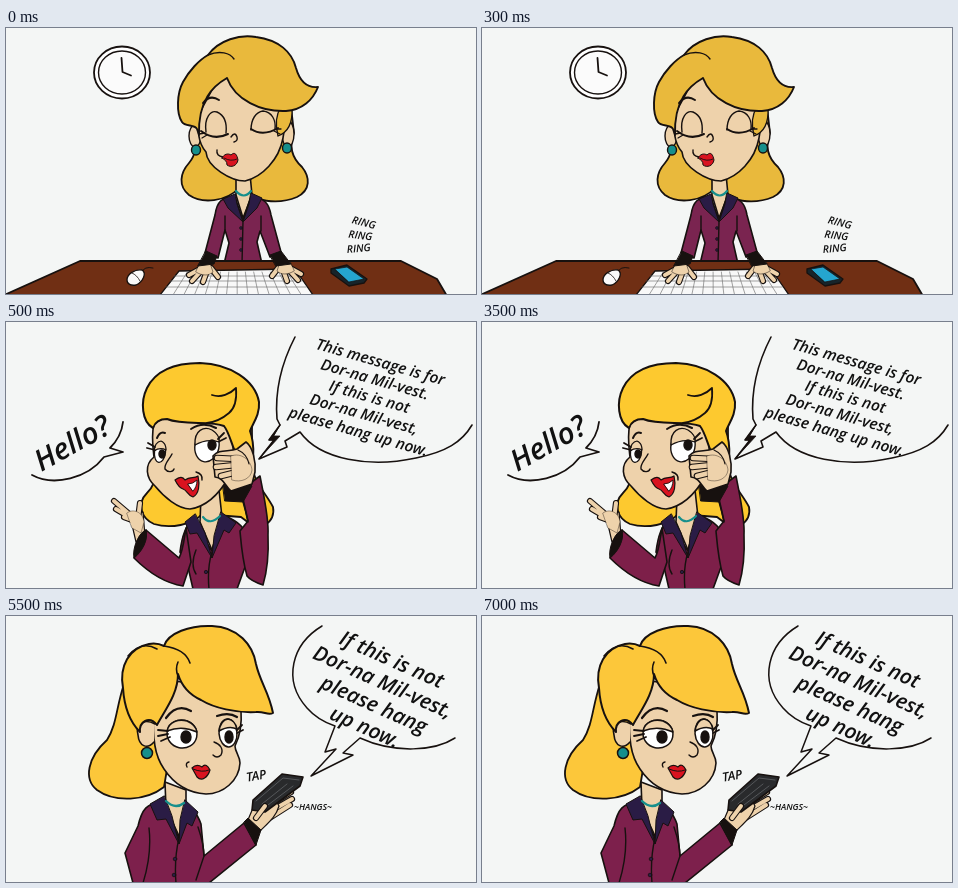
These frames come from a looping animation (470 px wide and 266 px high, 8 s). An HTML page:

```html
<!DOCTYPE html>
<html lang="en">
<head>
<meta charset="utf-8">
<title>Phone call</title>
<style>
  html, body { margin: 0; width: 100%; height: 100%; overflow: hidden; background: #f4f6f5; }
  svg { display: block; width: 100%; height: 100%; }
  .scene { visibility: hidden; }
  path, ellipse { stroke-linecap: round; stroke-linejoin: round; }
  text { font: italic 600 14px "Open Sans", "Noto Sans", sans-serif; fill: #111; }
</style>
</head>
<body>
<svg id="stage" viewBox="0 0 470 266"></svg>
<script>
const INK = '#17110f', SKIN = '#eed2ab', TEAL = '#168f8c', RED = '#d9131f', NAVY = '#2a1c45';
const LOOP = 8000;

const shape = (d, fill, w = 1.6) =>
  `<path d="${d}" fill="${fill}" stroke="${INK}" stroke-width="${w}"/>`;
const line = (d, w = 1.4, color = INK) =>
  `<path d="${d}" fill="none" stroke="${color}" stroke-width="${w}"/>`;
const oval = (x, y, rx, ry, fill, w = 1.4, turn = 0) =>
  `<ellipse cx="${x}" cy="${y}" rx="${rx}" ry="${ry}" fill="${fill}" stroke="${INK}" stroke-width="${w}" transform="rotate(${turn} ${x} ${y})"/>`;
// Outlined rounded strokes, used for fingers
const limb = (d, w = 5) => line(d, w + 2.2) + line(d, w, SKIN);
const label = (str, x, y, size, turn) =>
  `<text transform="translate(${x} ${y}) rotate(${turn})" text-anchor="middle" style="font-size:${size}px">${str}</text>`;
const lines = (list, x, y, dx, dy, size, turn) =>
  list.map((str, i) => label(str, x + dx * i, y + dy * i, size, turn)).join('');

function clock() {
  return oval(116, 44.5, 28, 26, '#fff', 1.8) + oval(116, 44.5, 23.5, 21.5, '#fbfbfb', 1.4) +
    line('M115.5 30L116.5 44L125 47.5', 1.8);
}

function keyboard() {
  let keys = '';
  for (const y of [248, 253, 259]) keys += `M${172 - (y - 243) * .75} ${y}H${289 + (y - 243) * .7}`;
  for (let i = 1; i < 14; i++) keys += `M${173 + i * 8.3} 244L${157 + i * 10.6} 266`;
  return shape('M173 243L289 241L307 267H154Z', '#f8f8f8', 1.3) + line(keys, .6, '#666');
}

function deskScene() {
  const hair = '#e9b93c', coat = '#7a2450';
  const hand = limb('M0 6L-11 12M2 7L-8 18M7 8L3 19M11 5L18 14', 4) +
    shape('M0 0L10 0L13 9C9 13 2 13 -4 9Z', SKIN, .5);
  return clock() +
    shape('M188 98C192 116 190 127 183 135C174 145 172 158 183 167C196 176 220 174 233 160C248 174 272 177 291 169C305 162 304 149 296 139C285 129 283 118 288 105L284 70L200 60Z', hair, 1.8) +
    shape('M230 148V167L237 190L246 167L244 146Z', SKIN) +
    shape('M229 169C216 169 211 173 209 187L199 225L212 230L219 202L223 215L218 236H256L251 214L254 203L264 229L275 224L265 187C263 175 258 170 245 168L237 193Z', coat) +
    line('M219 188V203M255 188V203M237 193L236 236') +
    shape('M229 166L217 171L222 180L237 194L231 176Z', NAVY, 1) +
    shape('M245 165L256 170L251 180L237 194L243 176Z', NAVY, 1) +
    line('M230 163Q238 172 245 163', 2.2, TEAL) +
    [200, 211, 222].map(y => oval(235, y, 1.4, 1.4, NAVY, .7)).join('') +
    oval(189, 108, 6, 11, SKIN) + oval(282, 106, 6, 13, SKIN) +
    oval(190, 122, 4.5, 5, TEAL) + oval(281, 120, 4.5, 5, TEAL) +
    shape('M194 84C190 104 193 116 200 124C201 139 225 153 239 153C256 149 273 132 277 110C280 94 279 78 270 72L215 45Z', SKIN) +
    shape('M275 79C269 88 270 100 272 108C280 105 287 98 286 80Z', hair, 1.3) +
    shape('M191 101C189 96 179 99 176 94C170 85 171 65 177 54C183 43 193 32 202 27C213 12 234 6 250 9C273 12 286 24 290 40C294 54 302 60 312 59C307 72 296 82 280 83C255 84 229 72 221 50C207 58 192 72 193 107Z', hair, 1.9) +
    line('M202 27C214 22 224 25 228 31') +
    line('M197 75Q204 66 213 72', 2) +
    line('M200 104C198 89 205 82 211 84C220 88 221 96 220 105M245 102C245 91 250 84 257 83C266 84 270 92 269 101') +
    line('M195 103Q208 113 222 106M245 101Q257 109 272 100', 2) +
    line('M199 105L193 106M201 107L196 110M270 101L275 101M268 103L274 106', 1.3) +
    line('M225 109Q229 103 231 109Q232 113 228 114M211 122Q210 128 217 129') +
    shape('M216 130C218 126 222 125 225 127C229 123 231 127 232 132C231 138 225 140 221 137C221 133 219 132 216 130Z', RED, 1) +
    line('M218 130Q225 134 231 131', .9) +
    shape('M74 233H395L431 251L441 268H-4Z', '#702f14', 1.8) +
    keyboard() +
    `<g transform="translate(194 235)">${hand}</g><g transform="translate(284 234) scale(-1 1)">${hand}</g>` +
    shape('M200 223L211 228L208 236L192 238Z', INK, 1) +
    shape('M264 227L275 223L285 236L270 238Z', INK, 1) +
    line('M136 244Q138 238 147 240', 1) +
    shape('M121 252C121 246 129 241 136 242C141 245 137 254 130 257C125 258 121 256 121 252Z', '#fafafa', 1.3) +
    line('M126 245Q131 247 134 253', .8) +
    shape('M325 241L341 237L361 251L358 255L343 258L325 245Z', '#17242a', 1.3) +
    shape('M329 241L341 239L358 251L343 254Z', '#25a5cf', .7) +
    label('RING', 357, 198, 10.5, 15) + label('RING', 354, 211, 10.5, 7) + label('RING', 353, 224, 10.5, -5);
}

function helloScene() {
  const hair = '#fdc92f', coat = '#7d1f49';
  return shape('M148 110C152 140 153 160 141 171C130 182 136 197 148 202C164 207 187 203 196 192L235 195C255 212 270 200 267 185C258 168 246 160 246 138V90Z', hair, 1.8) +
    shape('M195 174L194 200L206 228L216 195L213 168Z', SKIN) +
    shape('M186 199C179 204 176 214 174 230L182 245L187 267H231L239 245L241 213C236 201 226 196 215 193L206 229Z', coat) +
    shape('M180 206C178 218 177 229 173 236L140 208L128 236C143 251 158 261 177 264L185 240Z', coat) +
    shape('M235 168L254 154C258 175 263 196 262 213C263 236 260 253 257 263C251 261 245 259 241 254C236 236 235 220 234 209L242 199Z', coat) +
    line('M242 200Q240 190 237 180M190 228Q184 243 190 252M206 230Q201 246 203 267') +
    shape('M189 192L179 200L184 212L191 211L206 236L199 211Z', NAVY, 1) +
    shape('M215 190L230 201L223 211L218 208L206 236L208 214Z', NAVY, 1) +
    line('M197 195Q204 204 214 194', 2.2, TEAL) +
    oval(200, 250, 1.7, 1.7, NAVY, .8) +
    shape('M148 102C145 114 147 126 148 135C138 143 140 156 149 164C158 175 172 187 184 187C198 185 212 174 223 155C230 134 228 105 220 92L190 75Z', SKIN) +
    shape('M147 106C136 100 134 80 141 66C150 48 170 41 194 41C224 42 249 58 253 80C254 93 247 101 244 109C249 122 247 130 247 140L238 140C227 136 226 114 218 104C205 98 178 104 161 97C153 97 149 100 147 106Z', hair, 2) +
    line('M206 73C215 76 224 72 230 66C231 78 229 86 223 91C216 97 209 100 201 101', 1.8) +
    line('M151 116Q154 109 159 111M185 107Q197 99 210 106', 2) +
    oval(154, 130, 5.5, 10.5, '#fff', 1.3, 7) + oval(201, 124, 12, 16, '#fff', 1.4, 12) +
    shape('M189 123C188 108 198 104 206 108Q214 113 213 120Q201 116 189 123Z', SKIN, 1.3) +
    shape('M148 129Q149 120 155 119Q160 121 160 128Q154 125 148 129Z', SKIN, 1.2) +
    oval(156, 132, 3, 4, INK) + oval(206, 123, 4, 5, INK) +
    line('M149 125L142 121M149 128L141 126M212 117L218 111M214 119L220 116', 1.8) +
    line('M166 132C163 138 158 142 159 147C162 151 167 150 168 147M190 150Q197 152 196 158') +
    shape('M169 158C174 154 177 155 179 158C184 154 188 157 192 154C194 163 193 172 187 175C182 174 181 168 177 167C173 166 171 162 169 158Z', RED, 1.2) +
    shape('M182 162Q187 162 191 158Q191 165 187 169Z', '#fff', .9) +
    // hand at the ear
    shape('M217 164L240 158L246 164L237 180L219 179Z', INK, 1) +
    shape('M207 134C213 127 222 130 231 127L240 120C247 125 250 140 249 150L246 162L225 169C219 164 218 156 209 155Z', SKIN) +
    limb('M231 137L211 136M230 143L210 145M231 150L215 154', 4.5) +
    shape('M225 134C235 130 245 138 246 148C245 157 235 161 226 158Z', SKIN, .4) +
    line('M232 128Q241 132 243 142', 1.2) +
    // raised hand
    shape('M124 194L137 190L139 214L130 220Z', SKIN, 1.2) +
    limb('M128 196L108 179M127 197L110 187M129 199L118 195M132 197L134 181', 4) +
    shape('M121 191C127 186 137 190 138 200L135 211L126 206Z', SKIN, .4) +
    shape('M140 208C133 210 126 226 128 236C136 230 143 217 140 208Z', INK, 1) +
    line('M26 153C48 165 82 156 98 135L117 130L104 126C112 118 116 109 117 100', 1.8) +
    label('Hello?', 71, 130, 29.5, -29) +
    line('M289 15C274 44 269 72 271 97L274 103L263 118L268 118L253 137L281 125L279 119L294 110C314 138 364 146 410 136C440 130 456 120 466 103', 1.6) +
    shape('M274 103L263 118L268 118L253 137L274 114L268 114Z', INK, .8) +
    lines(['This message is for', 'Dor-na Mil-vest.', 'If this is not', 'Dor-na Mil-vest,', 'please hang up now.'],
      373, 45, -5.5, 17.4, 15.5, 16);
}

function hangUpScene() {
  const hair = '#fcc73a', coat = '#7d204c';
  return shape('M118 68C110 92 111 108 101 124C82 141 77 163 91 174C109 187 140 185 158 171L170 100Z', hair, 1.8) +
    shape('M159 166L160 192L174 222L180 195L180 174Z', SKIN) +
    shape('M155 187C141 187 136 193 132 210L119 237L127 267H203L250 229L238 207L198 240L195 208C191 197 187 193 180 191L173 222Z', coat) +
    line('M143 212Q146 238 137 267M173 222Q168 243 170 267M192 211Q198 229 198 240L190 264') +
    shape('M158 180L144 188L151 204L160 203L173 228L166 200Z', NAVY, 1) +
    shape('M179 184L192 196L186 210L181 207L173 228L174 204Z', NAVY, 1) +
    line('M160 185Q169 194 178 187', 2.4, TEAL) +
    oval(169, 243, 1.8, 1.8, NAVY, .8) + oval(168, 259, 1.8, 1.8, NAVY, .8) +
    shape('M149 98C146 120 149 140 158 153C168 168 183 177 200 178C217 178 233 165 234 147C234 140 229 136 229 130C234 120 236 108 235 94L202 68L165 65Z', SKIN) +
    shape('M149 108C138 102 129 108 132 119C133 130 141 134 148 126', SKIN) +
    oval(141, 137, 5.5, 5.5, TEAL, 1.5) +
    shape('M117 72C113 50 123 32 143 28C149 27 154 28 158 30C162 17 184 9 206 10C232 11 247 29 250 48C254 66 263 76 267 97C262 100 258 95 250 96C230 97 208 92 195 84C182 78 175 68 172 58C172 78 159 94 151 109C143 99 133 106 134 116C123 105 118 88 117 72Z', hair, 2) +
    line('M158 30C172 32 181 38 184 47M122 40Q135 24 151 33M172 60Q169 53 172 46', 1.6) +
    line('M160 102Q171 87 185 95M211 100Q223 96 231 101', 2.2) +
    oval(176, 118, 15, 14, '#fff', 1.5, 12) + oval(222, 117, 9, 14, '#fff', 1.5, -4) +
    shape('M161 115C163 105 173 103 181 105Q190 109 191 116Q176 109 161 115Z', SKIN, 1.5) +
    shape('M213 115Q215 104 222 103Q229 104 231 113Q223 109 213 115Z', SKIN, 1.5) +
    oval(180, 121, 5, 6, INK) + oval(223, 121, 4, 6, INK) +
    line('M162 115L152 114M162 118L152 120M164 121L155 125M231 114L236 109M231 117L237 114', 1.8) +
    line('M208 126C214 128 218 133 215 139Q211 143 207 139M181 151Q179 147 183 146') +
    shape('M186 152C190 148 193 149 196 151C199 147 202 150 204 154C202 161 196 166 191 161Z', RED, 1.2) +
    line('M187 153Q196 157 203 154', 1) +
    // hand holding the phone
    limb('M262 203L284 189M260 198L286 183M258 192L285 176', 4) +
    shape('M240 207C244 202 245 193 251 186L269 183L273 190C270 201 262 207 254 215Z', SKIN, 1.2) +
    shape('M247 184L276 158L297 161L294 170L259 196L246 194Z', '#292a2c', 1.6) +
    line('M250 185L277 162L293 164M256 188L281 168M262 189L287 170', 1, '#55575a') +
    limb('M250 202L259 190', 4) +
    shape('M238 206L242 202L255 214L250 229Z', INK, 1) +
    label('TAP', 251, 164, 12.5, -10) +
    label('~HANGS~', 307, 194, 8.8, 0) +
    line('M316 10C286 28 276 64 301 92C308 100 317 106 329 110L319 136L330 133L305 160L347 139L337 137L354 122C389 138 429 135 449 122', 1.5) +
    lines(['If this is not', 'Dor-na Mil-vest,', 'please hang', 'up now.'], 383, 50, -9, 22.5, 20.8, 24);
}

const scenes = [
  { start: 0, end: 500, draw: deskScene },
  { start: 500, end: 5500, draw: helloScene },
  { start: 5500, end: LOOP, draw: hangUpScene },
];

const stage = document.getElementById('stage');
stage.innerHTML = scenes.map(s => `<g class="scene">${s.draw()}</g>`).join('');
const groups = [...stage.querySelectorAll('.scene')];

function show() {
  const t = performance.now() % LOOP;
  scenes.forEach((s, i) => {
    groups[i].style.visibility = t >= s.start && t < s.end ? 'visible' : 'hidden';
  });
  requestAnimationFrame(show);
}
show();
</script>
</body>
</html>
```
